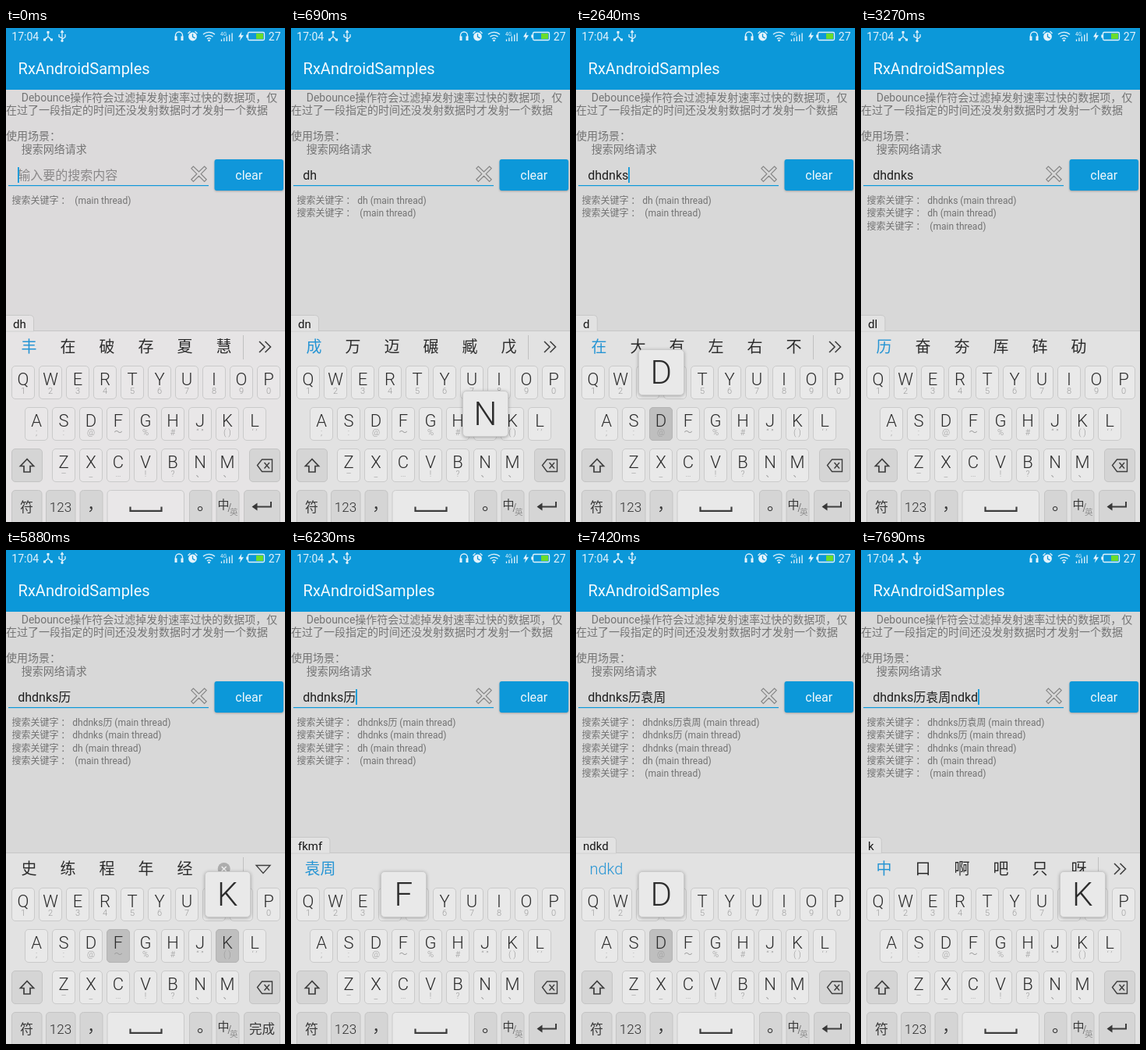
Write an HTML page that moves like this. It is 358 by 632 pixels and loops after 8 s.

```html
<!DOCTYPE html>
<html lang="zh-CN">
<head>
<meta charset="utf-8">
<style>
html, body { margin: 0; width: 100%; height: 100%; overflow: hidden; background: #d8d8d8; }
svg { display: block; width: 358px; height: 632px; --page: #d8d8d8; --pad: #e2e2e2; --key: #e9e9e9; --bar: #0c98d9; }
svg.warm { --page: #dcdadb; --pad: #e6e4e5; --key: #e9e7e8; --bar: #1097da; }
text { font-family: Roboto, "Noto Sans CJK SC", "Noto Sans CJK", sans-serif; white-space: pre; }
.thin { font-weight: 300; }
.page { fill: var(--page); } .pad { fill: var(--pad); } .bar { fill: var(--bar); }
.key { fill: var(--key); stroke: #cacaca; }
.tab { fill: var(--pad); stroke: #c8c8c8; }
.fn { fill: #d5d5d5; stroke: #c4c4c4; }
.hit { fill: #bfbfbf; stroke: #b4b4b4; }
.line { fill: none; stroke: #3e3e3e; stroke-width: 2; }
.icon { fill: none; stroke: #e4f3fb; stroke-width: 1.3; }
.solid { fill: #e4f3fb; }
.lift { filter: drop-shadow(0 1.5px 2px rgba(0,0,0,.3)); }
.low { filter: drop-shadow(0 1px 1px rgba(0,0,0,.25)); }
</style>
</head>
<body>
<svg id="stage" viewBox="0 0 358 632" xmlns="http://www.w3.org/2000/svg"></svg>
<script>
const LOOP = 8000;
const BLUE = '#2795d4', INK = '#383838', PALE = '#e4f3fb';

const txt = (s, x, y, size, fill = INK, cls = '', anchor = 'start') =>
  `<text x="${x}" y="${y}" font-size="${size}" fill="${fill}" class="${cls}" text-anchor="${anchor}">${s}</text>`;
const mid = (s, x, y, size, fill, cls) => txt(s, x, y, size, fill, cls, 'middle');
const box = (x, y, w, h, cls, r = 0) =>
  `<rect x="${x}" y="${y}" width="${w}" height="${h}" rx="${r}" class="${cls}"/>`;
const path = (d, cls, more = '') => `<path d="${d}" class="${cls}" ${more}/>`;

// Letter rows: letters, small signs, first centre, top
const ROWS = [
  ['QWERTYUIOP', [...'1234567890'], 22, 432],
  ['ASDFGHJKL', [';', ':', '@', '～', '%', '#', '“ ”', '( )', '‘ ’'], 39, 485],
  ['ZXCVBNM', ['–', '_', '…', '!', '?', '、', '、'], 74, 538]
];

function keyAt(letter) {
  for (const [letters, signs, x0, top] of ROWS) {
    const i = letters.indexOf(letter);
    if (i >= 0) return { x: x0 + 35 * i, top, sign: signs[i] };
  }
}

function letterKey(letter, cls = 'key') {
  const { x, top, sign } = keyAt(letter);
  return box(x - 14.5, top + .5, 29, 42, cls, 4.5) +
    mid(letter, x, top + 25, 22, '#2c2c2c', 'thin') +
    mid(sign, x, top + 36, 11, '#9a9a9a', 'thin');
}

function popup(letter) {
  const { x, top } = keyAt(letter);
  return `<g class="lift">${box(x - 28.5, top - 73.5, 58, 58, 'key', 4.5)}</g>` +
    mid(letter, x + .3, top - 30, 42, '#2c2c2c', 'thin');
}

function statusBar() {
  const bars = [0, 1, 2, 3, 4].map(i => `M${276.5 + 3.4 * i} 17V${14.5 - 2 * i}`).join('');
  return txt('17:04', 7.3, 15.6, 14, PALE) +
    path('M54 5V11L49.5 15M54 11L58.5 15', 'icon') +
    path('M52.5 4h3v3h-3zM48 13.5h3v3h-3zM57 13.5h3v3h-3z', 'solid') +
    path('M72 4V17M72 13L68 11V8M72 14.5L76 11.5V8M70.3 6L72 3.5L73.7 6', 'icon') +
    '<circle cx="72" cy="16.3" r="1.6" class="solid"/>' +
    path('M217.5 12V9.5a4.5 4.5 0 0 1 9 0V12', 'icon') +
    path('M216.5 10.5h3v5.5h-3zM224.5 10.5h3v5.5h-3z', 'solid') +
    '<circle cx="239.5" cy="11" r="5.4" class="solid"/>' +
    path('M239.5 7.5V11.3L242.5 12.8', '', 'fill="none" stroke="#0c98d9" stroke-width="1.3"') +
    path('M233.5 7L236.5 4.3M245.5 7L242.5 4.3', 'icon') +
    path('M253 8.3a11 11 0 0 1 15 0M255.5 11.2a7.5 7.5 0 0 1 10 0M258 14a3.8 3.8 0 0 1 5 0', 'icon') +
    '<circle cx="260.5" cy="16" r="1.3" class="solid"/>' +
    path(bars, 'icon') + txt('4G', 275, 9.5, 6.5, PALE) +
    path('M302.5 4.5L298 11.5H301L299.8 16.5L305 9.2H301.8Z', 'solid') +
    '<rect x="310.5" y="5.5" width="21" height="10" rx="1.5" class="icon"/>' +
    '<rect x="321" y="7" width="9" height="7" fill="#6bdc2c"/>' +
    '<rect x="308.3" y="8.5" width="2" height="4" class="solid"/>' +
    txt('27', 336.8, 15.6, 14, PALE);
}

function screen() {
  const about = [
    ['Debounce操作符会过滤掉发射速率过快的数据项，仅', 19.7],
    ['在过了一段指定的时间还没发射数据时才发射一个数据', 0], null,
    ['使用场景：', 0],
    ['搜索网络请求', 19.7]
  ];
  return box(0, 0, 358, 632, 'page') + box(0, 0, 358, 79, 'bar') + statusBar() +
    txt('RxAndroidSamples', 15.6, 59, 20, '#f4fafd') +
    about.map((a, i) => a ? txt(a[0], a[1], 94 + 16.4 * i, 14, '#747474') : '').join('') +
    box(3, 201, 257, 1.2, 'bar') +
    path('M237.8 179.6L240.4 177L247.5 184L254.6 177L257.2 179.6L250.2 186.7L257.2 193.8L254.6 196.4L247.5 189.4L240.4 196.4L237.8 193.8L244.8 186.7Z',
      '', 'fill="none" stroke="#858585" stroke-width="1.2"') +
    `<g class="low">${box(267.5, 168, 88.5, 40, 'bar', 3)}</g>` +
    mid('clear', 311.7, 194, 16, '#f0f8fc');
}

function keyboard() {
  const low = [[7, 39.5, 'fn'], [51, 38.5, 'fn'], [94.5, 30, 'fn'], [129.5, 99.5, 'key'],
    [235, 29.5, 'fn'], [269.5, 30, 'fn'], [305, 47, 'fn']];
  return box(0, 388, 358, 244, 'pad') +
    path('M0 387.5H358', '', 'stroke="#c6c6c6"') +
    ROWS.flatMap(r => [...r[0]]).map(l => letterKey(l)).join('') +
    box(7.5, 538.5, 39, 42, 'fn', 4.5) + box(312.5, 538.5, 39, 42, 'fn', 4.5) +
    low.map(([x, w, cls]) => box(x + .5, 591.5, w - 1, 48, cls, 4.5)).join('') +
    path('M27 551.5L18.5 560.5H23V568H31V560.5H35.5Z', 'line', 'style="stroke-width:1.7"') +
    path('M322.5 559.5L328.5 552H341.5V567.5H328.5ZM331.5 556L338 563.5M338 556L331.5 563.5', 'line', 'style="stroke-width:1.4"') +
    mid('符', 26.5, 619, 17, INK, 'thin') + mid('123', 70, 619, 17, '#2c2c2c', 'thin') +
    txt('，', 104, 616, 21) + txt('。', 245, 616, 21) +
    path('M159.5 612.5V617.8H199.5V612.5', 'line', 'style="stroke-width:2.2"') +
    txt('中', 271.5, 614.5, 15, INK, 'thin') +
    path('M285 619L288.5 608', 'line', 'style="stroke-width:1;stroke:#777"') +
    txt('英', 287, 622.5, 10.5, '#8c8c8c', 'thin');
}

const MORE = path('M325 401L332 408L325 415M332.5 401L339.5 408L332.5 415', 'line', 'style="stroke-width:1.6"');
const DOWN = path('M321 403.5H339L330 413.5Z', 'line', 'style="stroke-width:1.3"');
const RULE = path('M304.5 393V424', '', 'stroke="#c0c0c0"');
const CANCEL = '<circle cx="279.7" cy="408" r="8" fill="#adadad"/>' +
  path('M276.7 405L282.7 411M282.7 405L276.7 411', '', 'stroke="#eee" stroke-width="1.5"');
const ENTER = path('M340 606V612.5H317', 'line') + path('M322.5 607.5L315.5 612.5L322.5 617.5Z', '', `fill="${INK}"`);

const LOG = ['', 'dh', 'dhdnks', 'dhdnks历', 'dhdnks历袁周'];

// Each step changes only the listed parts of the state
const STEPS = [
  [0, { warm: 1, text: '', caret: 1, code: 'dh', words: '丰在破存夏慧', side: 'more', pop: '', hit: '', logs: 1 }],
  [500, { warm: 0, text: 'dh', caret: 0, code: '', words: '', side: 'down' }],
  [590, { code: 'd', words: '在大有左右不', side: 'more', pop: 'D', logs: 2 }],
  [690, { code: 'dn', words: '成万迈碾臧戊', pop: 'N' }],
  [780, { pop: '' }],
  [870, { code: 'dnk', words: ['dnk'], side: '', pop: 'K', hit: 'K' }],
  [960, { hit: '' }],
  [1240, { code: 'dnks', words: ['dnks'], pop: 'S' }],
  [1330, { caret: 1 }],
  [2640, { text: 'dhdnks', code: 'd', words: '在大有左右不', side: 'more', pop: 'D', hit: 'D' }],
  [2730, { code: 'dl', words: '历奋夯厍砗劯', side: '', pop: 'L' }],
  [2810, { hit: '' }],
  [3090, { pop: '', logs: 3 }],
  [3270, { caret: 0 }],
  [5880, { text: 'dhdnks历', code: '', words: '史练程年经', side: 'down', pop: 'K', hit: 'FK', logs: 4 }],
  [5970, { code: 'fk', words: '吉喜袁嘉鼓喆', side: 'more', hit: '' }],
  [6060, { code: 'fkm', words: ['袁周'], side: '', pop: 'M' }],
  [6140, { caret: 1 }],
  [6230, { code: 'fkmf', pop: 'F' }],
  [6410, { text: 'dhdnks历袁周', code: '', words: '围年长而的', side: 'down', pop: '' }],
  [6500, { code: 'n', words: '民书必情收快', side: 'more', pop: 'N' }],
  [6590, { code: 'nd', words: '居剧忧恢怖惰', pop: 'D' }],
  [7150, { pop: '', caret: 0, logs: 5 }],
  [7240, { code: 'ndk', words: ['ndk'], side: '', pop: 'K' }],
  [7330, { hit: 'D' }],
  [7420, { code: 'ndkd', words: ['ndkd'], pop: 'D' }],
  [7510, { pop: '', hit: '' }],
  [7600, { text: 'dhdnks历袁周ndkd', code: 'k', words: '中口啊吧只呀', side: 'more', pop: 'K' }],
  [7690, { caret: 1 }]
];
let last = {};
const STATES = STEPS.map(([at, change]) => last = { ...last, ...change, at });

const EM = { d: .564, h: .551, n: .552, k: .507, s: .516, l: .243, f: .347, m: .876 };
const width = (s, size) => [...s].reduce((w, c) => w + (EM[c] || 1), 0) * size;

function codeTab(code) {
  const right = 18.8 + width(code, 15);
  return path(`M-1 367.5H${right - 5}q5 0 5 5V388H-1Z`, 'tab') +
    path(`M0 388H${right - .5}`, '', 'stroke="#dedede"') + txt(code, 9, 384, 15, '#161616');
}

function draw(s) {
  const logs = LOG.slice(0, s.logs).reverse();
  const caretX = 15 + width(s.text, 16);
  const words = typeof s.words === 'string'
    ? [...s.words].map((w, i) => mid(w, 29.5 + 50 * i, 415.3, 20, i || !s.code ? '#2c2c2c' : BLUE)).join('')
    : txt(s.words[0], 17.5, 415, 20, BLUE, 'thin');
  const side = s.side === 'more' ? RULE + MORE : s.side === 'down' ? CANCEL + RULE + DOWN : '';
  return txt(s.text || '输入要的搜索内容', 15.2, 194, 16, s.text ? '#1f1f1f' : '#8a8889') +
    (s.caret ? box(caretX, 178, 1.8, 20, 'bar') : '') +
    logs.map((l, i) => txt(`搜索关键字 ： ${l} (main thread)`, 7.4, 225 + 16.35 * i, 12, '#727272')).join('') +
    (s.code ? codeTab(s.code) : '') + words + side +
    (s.code ? ENTER : mid('完成', 328.5, 618.5, 16.5, INK, 'thin')) +
    [...s.hit].map(l => letterKey(l, 'hit')).join('') +
    (s.pop ? popup(s.pop) : '');
}

const stage = document.getElementById('stage');
stage.innerHTML = screen() + keyboard() + '<g id="live"></g>';
const live = document.getElementById('live');
const start = performance.now();
let shown;

function tick() {
  const t = (performance.now() - start) % LOOP;
  const state = STATES.findLast(s => s.at <= t);
  if (state !== shown) {
    shown = state;
    stage.setAttribute('class', state.warm ? 'warm' : '');
    live.innerHTML = draw(state);
  }
  requestAnimationFrame(tick);
}
tick();
</script>
</body>
</html>
```
